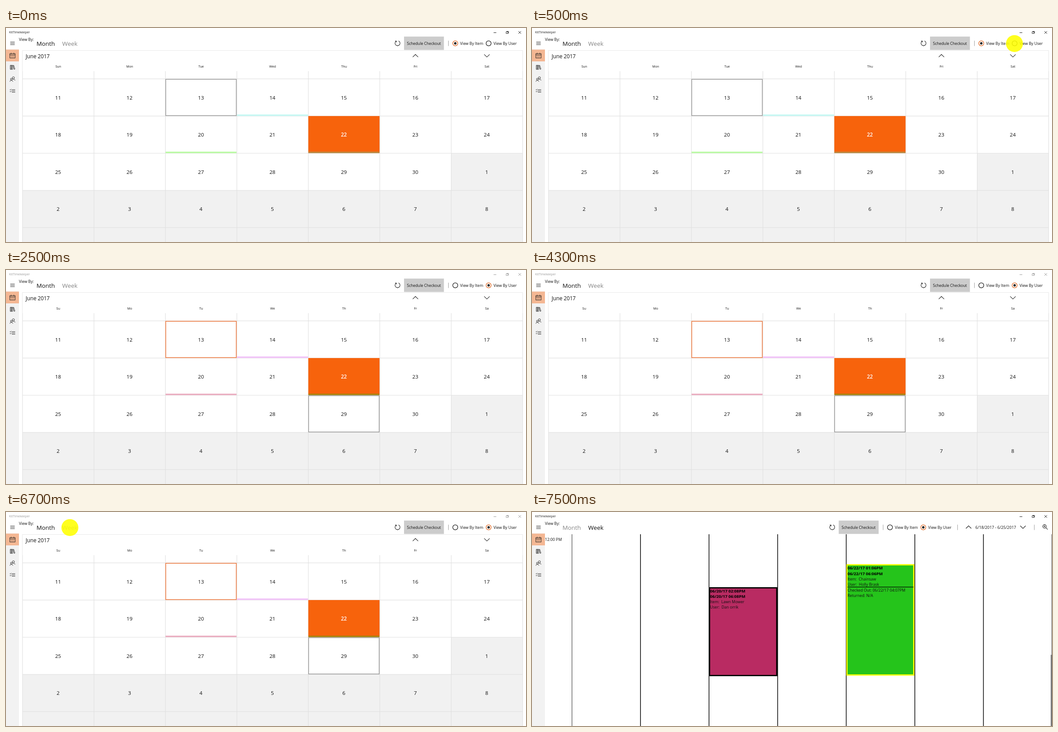
Recreate the animation shown at these times as an HTML page. Size 1164 px wide and 481 px high, loop 8 s.

```html
<!DOCTYPE html>
<html lang="en">
<head>
<meta charset="utf-8">
<title>Checkout calendar</title>
<style>
  html, body { margin: 0; width: 100%; height: 100%; overflow: hidden; background: #fff; }
  svg { display: block; width: 1164px; height: 481px; font-family: "Open Sans", "Noto Sans", sans-serif; }
  text { white-space: pre; }
</style>
</head>
<body>
<svg id="stage" viewBox="0 0 1164 481"></svg>
<script>
const LOOP = 8000;
const INK = '#1c1c1c', ORANGE = '#f7630c', GRID = '#e1e1e1', DIM = '#9a9a9a';
const TOP = 114.3, COL = 159.93, ROW = 83.6, LEFT = 37;
const DAYS = ['Sun', 'Mon', 'Tue', 'Wed', 'Thu', 'Fri', 'Sat'];
const stage = document.getElementById('stage');

const rect = (x, y, w, h, fill, extra = '') =>
  `<rect x="${x}" y="${y}" width="${w}" height="${h}" fill="${fill}" ${extra}/>`;
const path = (d, stroke = INK, width = 1, extra = '') =>
  `<path d="${d}" fill="none" stroke="${stroke}" stroke-width="${width}" ${extra}/>`;
const ring = (x, y, r, stroke = INK, width = 1) =>
  `<circle cx="${x}" cy="${y}" r="${r}" fill="none" stroke="${stroke}" stroke-width="${width}"/>`;
const text = (x, y, str, size = 8.67, fill = '#111', extra = '') =>
  `<text x="${x}" y="${y}" font-size="${size}" fill="${fill}" ${extra}>${str}</text>`;
const mid = (x, y, str, size, fill, weight = 400) =>
  text(x, y, str, size, fill, `text-anchor="middle" font-weight="${weight}"`);
const chevron = (x, y, dir) =>
  path(`M${x - 6} ${y + 3 * dir}L${x} ${y - 3 * dir}L${x + 6} ${y + 3 * dir}`, INK, 1.1);
const divider = x => path(`M${x} 28.5V40.5`, '#9c9c9c');
const frame = (col, row, color) =>
  rect(LEFT + col * COL + .7, TOP + row * ROW + 1, COL - 2, ROW - 2, 'none', `stroke="${color}" stroke-width="1.5"`);
const bar = (col, row, color) =>
  rect(LEFT + col * COL + .3, TOP + (row + 1) * ROW - 3.6, COL - 1.2, 3.4, color);

function titleBar(active) {
  const c = active ? INK : DIM;
  return text(7, 12.1, 'KitTimekeeper', 6.9, c) +
    path('M1091.5 10.5H1097.5', c) +
    path('M1119.5 8.5H1123.5V12.5H1119.5ZM1121 8.5V7.5H1125V11.5H1123.5', c, .9) +
    path('M1147 7L1153 13M1153 7L1147 13', c, .9);
}

function sidebar() {
  const dots = [11.5, 14.5, 17.5].map(x => `M${x - .6} 62.5h1.2M${x - .6} 65h1.2`).join('');
  return rect(0, 48, 29, 433, '#f2f2f2') + rect(0, 48.5, 29, 26.5, '#f4b793') +
    path('M9.5 31.5H19.5M9.5 34.5H19.5M9.5 37.5H19.5', INK, .9) +
    path('M8.5 57.5H20.5V67.5H8.5ZM8.5 60.3H20.5M11.5 55.8V58.5M17.5 55.8V58.5', INK, .9) + path(dots) +
    path('M9.5 83.8H11.8V93H9.5ZM12.5 83.8H14.8V93H12.5ZM15.4 84.4L17.3 83.8L20 92.2L18 93Z', INK, .9) +
    ring(16.6, 112, 2.4, INK, .9) + ring(12, 115, 2.1, INK, .9) +
    path('M8.8 120.5C9 116.5 15 116.5 15.2 120.5M15 115.2C18 114.2 20 115.7 20.1 118', INK, .9) +
    path('M13 138.5H20.5M13 141.5H20.5M13 144.5H20.5M8.5 138.3L9.8 139.6L12 137M8.5 142.5L9.8 143.8L12 141.2', INK, .9);
}

function radio(x, label, on) {
  return ring(x, 34.5, 5.6, on ? '#e0641c' : INK, 1.3) +
    (on ? `<circle cx="${x}" cy="34.5" r="2.7" fill="${INK}"/>` : '') + text(x + 10.9, 38.1, label);
}

function toolbar(week, byUser) {
  const tab = on => on ? '#111' : '#858585';
  const tools =
    path('M873.3 29.6A5.6 5.6 0 1 0 878.6 29.1M870.9 29.2H873.8V32.2', INK, 1.1) +
    rect(891, 19.3, 89.3, 30, '#cccccc') + mid(935.5, 38.1, 'Schedule Checkout', 8.6) +
    divider(990.4) + radio(1005.7, 'View By Item', !byUser) + radio(1080.3, 'View By User', byUser);
  return text(29, 29.2, 'View By:', 8.6) +
    text(68.2, 39.7, 'Month', 13.4, tab(!week)) + text(125.8, 39.7, 'Week', 13.4, tab(week)) +
    `<g transform="translate(${week ? -204.4 : 0})">${tools}</g>`;
}

function month(byUser) {
  let out = rect(LEFT + 6 * COL, TOP + 2 * ROW, COL, ROW, '#f1f1f1') +
    rect(LEFT, TOP + 3 * ROW, 7 * COL, 120, '#f1f1f1');
  let lines = '';
  for (let c = 0; c <= 7; c++) lines += `M${LEFT + c * COL} 97V481`;
  for (let r = 0; r <= 4; r++) lines += `M${LEFT} ${TOP + r * ROW}H${LEFT + 7 * COL}`;
  out += path(lines, GRID, 1.2) + path('M36.5 97V50.5H1156.5V97', '#e8e8e8');
  out += rect(LEFT + 4 * COL, TOP + ROW, COL - .5, ROW - .6, ORANGE);
  out += bar(3, 0, byUser ? '#f1c3f8' : '#c6f8f4') + bar(2, 1, byUser ? '#ecafc2' : '#bcfba6') +
    bar(4, 1, byUser ? '#a9810c' : '#bd8740');
  out += frame(2, 0, byUser ? '#ee7336' : '#999');
  if (byUser) out += frame(4, 2, '#999');
  DAYS.forEach((day, c) => {
    const x = LEFT + (c + .5) * COL;
    out += mid(x, 89, byUser ? day.slice(0, 2) : day, 7.1, '#111');
    for (let r = 0; r < 4; r++) {
      const n = 11 + r * 7 + c, today = n === 22;
      out += mid(x - .4, TOP + (r + .5) * ROW + 4.5, n > 30 ? n - 30 : n, 11.6, today ? '#fff' : '#111', today ? 600 : 400);
    }
  });
  return out + text(44, 67.8, 'June 2017', 11.7) + chevron(916.5, 62.3, 1) + chevron(1076.5, 62.3, -1);
}

function booking(x, y, w, h, fill, edge, times, notes) {
  let out = rect(x + 1.4, y + 1.4, w - 2.8, h - 2.8, fill, `stroke="${edge}" stroke-width="2.8"`);
  times.forEach((s, i) => out += text(x + 2.6, y + 12.1 + i * 12.1, s, 9.15, '#000', 'font-weight="700"'));
  notes.forEach((s, i) => out += text(x + 2.6, y + 36.2 + i * 12.1 + (i > 1 ? .8 : 0), s, 8.67, '#111'));
  return out;
}

function week() {
  let lines = '';
  for (let i = 1; i < 7; i++) lines += `M${89.2 + i * 153.55} 50V481`;
  return path('M89.5 50V481', '#222') + path(lines, '#000', 1.5) + path('M1163.5 50V481', '#555') +
    rect(1161, 321, 2.2, 160, '#8a8a8a') + text(29, 65.3, '12:00 PM', 8.75) +
    booking(396, 169, 153.3, 200, '#b92b62', '#000',
      ['06/20/17 02:08PM', '06/20/17 06:08PM'], ['Item:  Lawn Mower', 'User:  Dan orrik']) +
    booking(703.6, 117.3, 152.4, 250.4, '#25c41b', '#ffff00',
      ['06/22/17 01:06PM', '06/22/17 06:06PM'],
      ['Item:  Chainsaw', 'User:  Holly Brask', 'Checked Out: 06/22/17 04:07PM', 'Returned: N/A']) +
    path('M706 168.7H854', '#000', 1.3) +
    divider(952.6) + chevron(977.3, 34, 1) + mid(1038, 38.1, '6/18/2017 - 6/25/2017', 8.85) +
    chevron(1099, 34, -1) + divider(1124.4) +
    ring(1147.3, 32.3, 3.9, INK, 1.1) + path('M1150.2 35.2L1154.3 39.3M1145.3 32.3H1149.3M1147.3 30.3V34.3', INK, 1.1);
}

const tap = x => `<circle cx="${x}" cy="35" r="19" fill="#ff0" fill-opacity=".88"/>`;

const monthPage = byUser => titleBar(!byUser) + sidebar() + toolbar(false, byUser) + month(byUser);
const scenes = [
  { until: 500, art: monthPage(false) },
  { until: 2500, art: monthPage(false) + tap(1080) },
  { until: 5500, art: monthPage(true) },
  { until: 7500, art: monthPage(true) + tap(143) },
  { until: LOOP, art: titleBar(true) + sidebar() + toolbar(true, true) + week() }
];

let shown;
function draw(time) {
  const t = time % LOOP;
  const scene = scenes.find(s => t < s.until);
  if (scene !== shown) {
    stage.innerHTML = scene.art;
    shown = scene;
  }
}

const start = performance.now();
function tick() {
  draw(performance.now() - start);
  requestAnimationFrame(tick);
}
tick();
</script>
</body>
</html>
```
